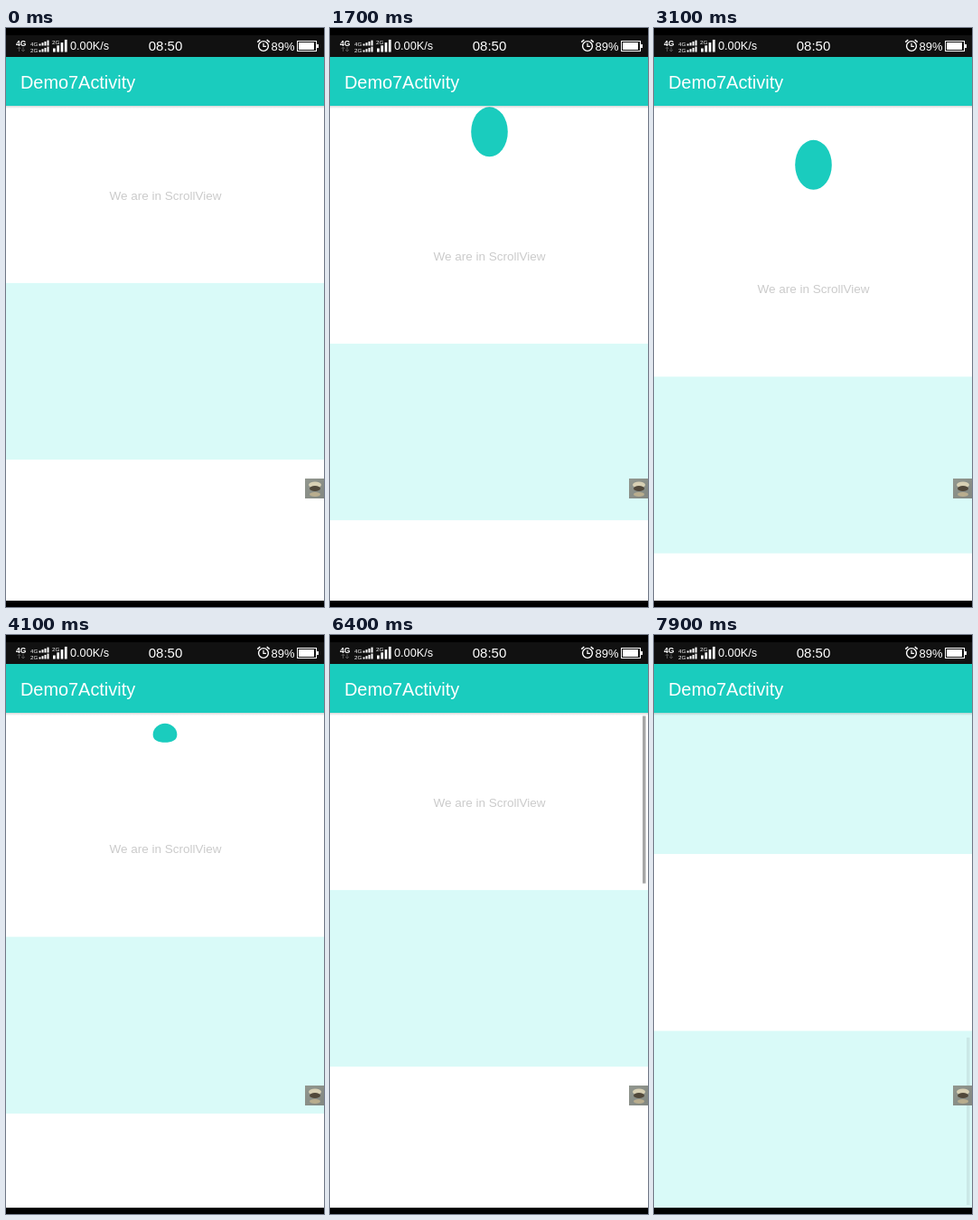
Write an HTML page with a canvas that moves like this. It is 352 px wide and 640 px high and loops after 8 s.

```html
<!DOCTYPE html>
<html lang="en">
<head>
<meta charset="utf-8">
<title>Pull to refresh</title>
<style>
  html, body { margin: 0; width: 100%; height: 100%; overflow: hidden; background: #000; }
  canvas { display: block; width: 352px; height: 640px; }
</style>
</head>
<body>
<canvas id="stage" width="352" height="640"></canvas>
<script>
const ctx = document.getElementById('stage').getContext('2d');
const LOOP = 8000, STEP = 100;
const W = 352, TOP = 86.5, BOTTOM = 633;
const VIEW = BOTTOM - TOP, ROW = 195.4, ROWS = 8;
const CONTENT = ROW * ROWS, MAX_SCROLL = CONTENT - VIEW;
const REFRESH = 78.5;
const TEAL = '#1accbe', PALE = '#d9faf8', BAR = '#111111';
const FONT = '"Liberation Sans", Arial, sans-serif';

// Pull distance over time: [ms, px]
const PULL = [
  [0, 0], [900, 115], [1000, 115], [1200, REFRESH], [1600, REFRESH], [1700, 67], [1900, 0],
  [2100, 0], [2700, 89], [3100, 103.5], [3200, 103.5], [3400, REFRESH], [3600, REFRESH], [3850, 0],
  [3900, 0], [4100, 51.7], [4500, 87], [4900, 111], [5000, 111], [5200, REFRESH], [5500, REFRESH],
  [5900, 0], [LOOP, 0]
];
const FLING = { start: 6400, end: 7400, power: 3.06 };

const clamp = v => Math.max(0, Math.min(1, v));

function pullAt(t) {
  const i = PULL.findIndex(key => key[0] > t);
  const [t0, a] = PULL[i - 1], [t1, b] = PULL[i];
  return { dist: a + (b - a) * (t - t0) / (t1 - t0), rising: b > a };
}

function scrollAt(t) {
  const p = clamp((t - FLING.start) / (FLING.end - FLING.start));
  return MAX_SCROLL * (1 - Math.pow(1 - p, FLING.power));
}

function rect(x, y, w, h, color) {
  ctx.fillStyle = color;
  ctx.fillRect(x, y, w, h);
}

function oval(x, y, rx, ry, color) {
  ctx.fillStyle = color;
  ctx.beginPath();
  ctx.ellipse(x, y, rx, ry, 0, 0, Math.PI * 2);
  ctx.fill();
}

function text(str, x, y, size, color = '#fff', align = 'left', weight = 'normal') {
  ctx.font = `${weight} ${size}px ${FONT}`;
  ctx.fillStyle = color;
  ctx.textAlign = align;
  ctx.fillText(str, x, y);
}

function line(color, width, ...points) {
  ctx.strokeStyle = color;
  ctx.lineWidth = width;
  ctx.beginPath();
  points.forEach(([x, y]) => ctx.lineTo(x, y));
  ctx.stroke();
}

// Rising signal bars standing on a base line
function signal(x, base, count, step, width, first, grow) {
  for (let i = 0; i < count; i++) {
    const h = first + grow * i;
    rect(x + i * step, base - h, width, h, '#fff');
  }
}

function drawEgg(y, s) {
  ctx.save();
  ctx.translate(176, y);
  ctx.scale(s, s);
  ctx.fillStyle = TEAL;
  ctx.beginPath();
  ctx.moveTo(0, -15.8);
  ctx.bezierCurveTo(11, -15.8, 20.3, -7, 20.3, 2.5);
  ctx.bezierCurveTo(20.3, 12.5, 11, 15.8, 0, 15.8);
  ctx.bezierCurveTo(-11, 15.8, -20.3, 12.5, -20.3, 2.5);
  ctx.bezierCurveTo(-20.3, -7, -11, -15.8, 0, -15.8);
  ctx.fill();
  ctx.restore();
}

function drawHeader(pull) {
  if (pull.dist <= 0) return;
  const edge = TOP + pull.dist;
  if (pull.rising && pull.dist < REFRESH) {
    const s = pull.dist / REFRESH;
    drawEgg(edge - 38.5 + 13 * s, s);
  } else {
    oval(176.5, edge - 38.7, 20.3, 27.5, TEAL);
  }
}

function drawRows(shift) {
  for (let i = 0; i < ROWS; i++) {
    rect(0, TOP + shift + i * ROW, W, ROW, i % 2 ? PALE : '#fff');
  }
  text('We are in ScrollView', 176.5, TOP + shift + 103, 13.5, '#cbcbcb', 'center');
}

function drawScrollbar(t, scroll) {
  if (t < FLING.start) return;
  const alpha = 0.35 * (1 - clamp((t - FLING.end - 300) / 250));
  const y = TOP + scroll / CONTENT * VIEW + 3;
  rect(346, y, 3.5, VIEW * VIEW / CONTENT - 6, `rgba(0,0,0,${alpha})`);
}

function drawThumb() {
  const g = ctx.createLinearGradient(331, 498, 352, 520);
  g.addColorStop(0, '#92978f');
  g.addColorStop(1, '#828781');
  rect(331, 498, 21, 22, g);
  oval(342, 505, 7, 3.5, '#d8d0b4');
  oval(342, 509, 6, 3, '#51483a');
  oval(342, 515.5, 6, 2.5, '#b9ad8e');
}

function drawStatus() {
  rect(0, 0, W, 8, '#000');
  rect(0, 8, W, 24, BAR);

  text('4G', 11, 20, 8.5, '#fff', 'left', 'bold');
  for (const [x, tip, tail] of [[14.5, 21, 26], [19, 26, 21]]) {
    const back = tip < tail ? 2 : -2;
    line('#555', 1, [x, tip], [x, tail]);
    line('#555', 1, [x - 1.8, tip + back], [x, tip], [x + 1.8, tip + back]);
  }

  text('4G', 27, 19.5, 6.2);
  text('2G', 27, 26.5, 6.2);
  signal(36.5, 19.5, 4, 3, 2, 2, 1.3);
  signal(36.5, 26.5, 4, 3, 2, 2, 1.3);
  text('2G', 51, 18, 6.2);
  signal(52, 26.5, 4, 4.3, 2.7, 4, 3.2);

  text('0.00K/s', 71, 24.3, 12.7);
  text('08:50', 176.5, 25, 15, '#fff', 'center');

  // Alarm clock
  ctx.strokeStyle = '#fff';
  ctx.lineWidth = 1.4;
  ctx.beginPath();
  ctx.arc(285, 20, 5.4, 0, Math.PI * 2);
  ctx.stroke();
  line('#fff', 1.2, [285, 16.8], [285, 20.4], [288, 20.4]);
  line('#fff', 1.5, [278.3, 15.6], [281.3, 13]);
  line('#fff', 1.5, [288.7, 13], [291.7, 15.6]);

  text('89%', 293.5, 24.5, 13);

  ctx.strokeStyle = '#fff';
  ctx.lineWidth = 1;
  ctx.strokeRect(322.5, 14.5, 21, 11);
  rect(324, 16, 17, 8, '#fff');
  rect(344, 18, 2, 4, '#fff');
}

function drawToolbar() {
  const g = ctx.createLinearGradient(0, 86, 0, 89);
  g.addColorStop(0, 'rgba(0,0,0,0.16)');
  g.addColorStop(1, 'rgba(0,0,0,0)');
  rect(0, 86, W, 3, g);
  rect(0, 32, W, 54, TEAL);
  text('Demo7Activity', 16, 67, 19.9);
}

function draw(t) {
  const pull = pullAt(t), scroll = scrollAt(t);
  rect(0, 0, W, 640, '#fff');
  ctx.save();
  ctx.beginPath();
  ctx.rect(0, 86, W, BOTTOM - 86);
  ctx.clip();
  drawRows(pull.dist - scroll);
  drawHeader(pull);
  drawScrollbar(t, scroll);
  ctx.restore();
  drawToolbar();
  drawStatus();
  rect(0, BOTTOM, W, 640 - BOTTOM, '#000');
  drawThumb();
}

const begin = performance.now();
function tick() {
  const t = (performance.now() - begin) % LOOP;
  draw(Math.floor(t / STEP) * STEP);
  requestAnimationFrame(tick);
}
tick();
</script>
</body>
</html>
```
